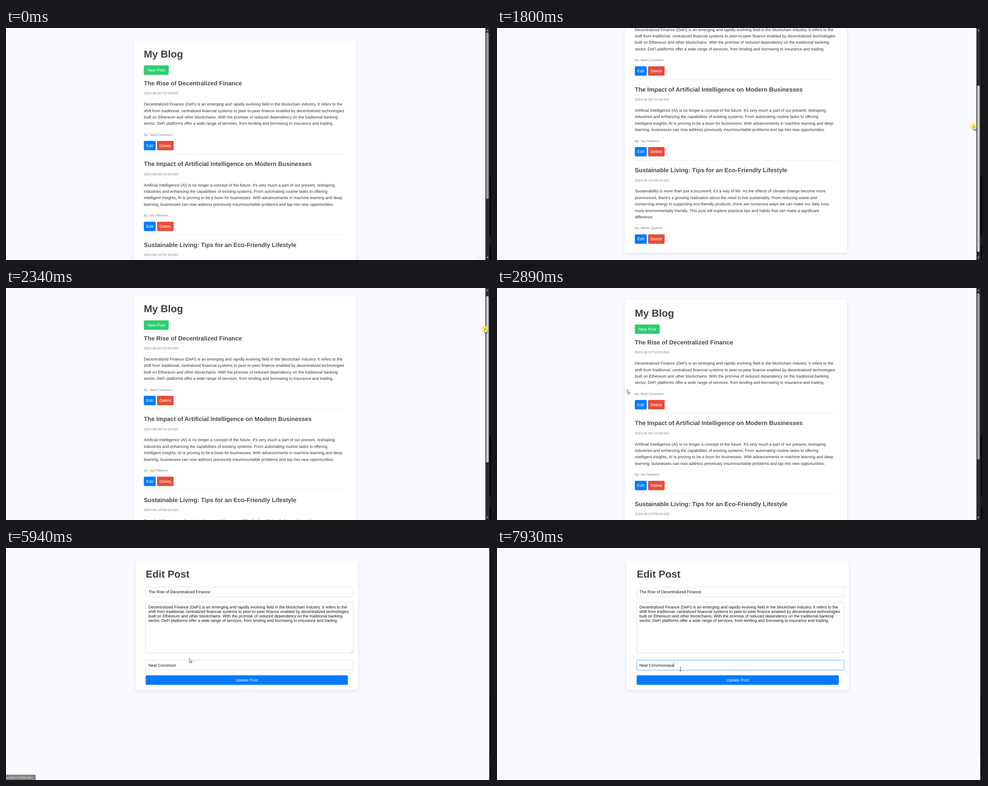
An HTML page for the animation above (8 s loop, 1082 by 518 pixels).

```html
<!DOCTYPE html>
<html lang="en">
<head>
<meta charset="utf-8">
<title>My Blog</title>
<style>
  html, body { margin: 0; width: 100%; height: 100%; overflow: hidden; background: #f8faff; }
  svg { display: block; width: 1082px; height: 518px; }
  text { font: 9px "Liberation Sans", Arial, sans-serif; fill: #333; text-rendering: geometricPrecision; }
  .h1 { font-size: 22.5px; font-weight: bold; fill: #404040; }
  .h2 { font-size: 13.5px; font-weight: bold; fill: #4a4a4a; }
  .small { font-size: 7.5px; fill: #808080; }
  .btn { fill: #fff; }
  .mid { text-anchor: middle; }
  .form { fill: #111; }
  .status { font-size: 6.8px; fill: #eadccd; }
  .field { fill: #fff; stroke: #d9d9d9; stroke-width: .8; }
</style>
</head>
<body>
<svg id="stage" viewBox="0 0 1082 518" xmlns="http://www.w3.org/2000/svg">
  <defs>
    <filter id="shadow" x="-10%" y="-10%" width="120%" height="120%">
      <feDropShadow dx="0" dy="2.2" stdDeviation="3.4" flood-color="#000" flood-opacity=".1"/>
    </filter>
  </defs>
  <rect width="1082" height="518" fill="#f8faff"/>
  <g id="list"></g>
  <g id="edit"></g>
  <g id="corner">
    <rect x="1049.5" y="510.5" width="21" height="9" fill="#f7f8fc" stroke="#e8eaf0" stroke-width=".8"/>
    <text x="1053" y="517" class="small" style="fill:#c8cad0">...</text>
  </g>
  <g id="bar">
    <rect x="1069.5" width="9" height="518" fill="#2b2b2b"/>
    <path d="M1071.4 6.8h5l-2.5-3.6zM1071.4 510.8h5l-2.5 3.6z" fill="#a0a0a0"/>
    <rect id="thumb" x="1071.2" y="10" width="5.6" height="371.5" rx="2.8"/>
  </g>
  <rect x="1078.3" width="4" height="518" fill="#000"/>
  <rect x="1079" width="3" height="331" fill="#161616"/>
  <rect x="1078.3" y="464.5" width="4" height="22.5" fill="#1d1d1d"/>
  <g id="status">
    <rect id="statusBox" x="-2" y="506.3" height="14" rx="1.5" fill="#1f140b" stroke="#574535" stroke-width=".7"/>
    <text id="statusText" class="status" x="-1.6" y="514.6"></text>
  </g>
  <circle id="press" r="7" fill="#fbe635" opacity=".75"/>
  <g id="cursor" stroke-linejoin="round">
    <path id="arrow" d="M0 0V9.6L2.3 7.5L3.8 10.8L5.2 10.2L3.7 7H6.7Z" fill="#fff" stroke="#333" stroke-width=".75"/>
    <path id="hand" d="M-.9.9Q-.9 0 0 0T.9.9V4.2Q1.8 3.6 2.5 4.5Q3.4 4 4 4.9Q5.3 4.7 5.3 6V8.8Q5.3 10.4 4.4 11.2V12.6H-.9V11.3Q-2 10-3.5 7.6Q-3.7 6.3-2.4 6.7L-.9 8Z" fill="#fff" stroke="#333" stroke-width=".75"/>
    <path id="beam" d="M-1.8-4.4H-.5L0-4L.5-4.4H1.8M0-4V4M-1.8 4.4H-.5L0 4L.5 4.4H1.8" fill="none" stroke="#333" stroke-width=".8"/>
  </g>
</svg>
<script>
const $ = id => document.getElementById(id);
const PITCH = 180.4, LEAD = 14.4, LOOP = 8000;
const AUTHOR = "Neal Corvinson";

const posts = [
  ["The Rise of Decentralized Finance", "2023-08-01T10:00:00Z", AUTHOR, [
    "Decentralized Finance (DeFi) is an emerging and rapidly evolving field in the blockchain industry. It refers to the",
    "shift from traditional, centralized financial systems to peer-to-peer finance enabled by decentralized technologies",
    "built on Ethereum and other blockchains. With the promise of reduced dependency on the traditional banking",
    "sector, DeFi platforms offer a wide range of services, from lending and borrowing to insurance and trading."]],
  ["The Impact of Artificial Intelligence on Modern Businesses", "2023-08-05T14:30:00Z", "Ida Pellarins", [
    "Artificial Intelligence (AI) is no longer a concept of the future. It's very much a part of our present, reshaping",
    "industries and enhancing the capabilities of existing systems. From automating routine tasks to offering",
    "intelligent insights, AI is proving to be a boon for businesses. With advancements in machine learning and deep",
    "learning, businesses can now address previously insurmountable problems and tap into new opportunities."]],
  ["Sustainable Living: Tips for an Eco-Friendly Lifestyle", "2023-08-10T09:15:00Z", "Martin Quarne", [
    "Sustainability is more than just a buzzword; it's a way of life. As the effects of climate change become more",
    "pronounced, there's a growing realization about the need to live sustainably. From reducing waste and",
    "conserving energy to supporting eco-friendly products, there are numerous ways we can make our daily lives",
    "more environmentally friendly. This post will explore practical tips and habits that can make a significant",
    "difference."]]
];

const text = (x, y, s, cls = "", id = "") => `<text x="${x}" y="${y}" class="${cls}" id="${id}">${s}</text>`;
const box = (x, y, w, h, attrs) => `<rect x="${x}" y="${y}" width="${w}" height="${h}" ${attrs}/>`;
const card = (x, h) => box(x, 28, 496, h, 'rx="4.5" fill="#fff" filter="url(#shadow)"');
const button = (x, y, w, fill, label, id = "") =>
  box(x, y, w, 21, `rx="2.3" fill="${fill}" id="${id}"`) + text(x + w / 2, y + 13.5, label, "btn mid");

function listPage() {
  let s = card(285, 640) + text(307.5, 65.6, "My Blog", "h1") +
    button(307.5, 83.4, 55.5, "#2ecc71", "New Post", "newBtn");
  posts.forEach(([title, date, by, lines], i) => {
    const y = i * PITCH, end = y + (lines.length - 4) * LEAD;
    s += text(307.5, 128 + y, title, "h2") + text(307.5, 148.4 + y, date, "small");
    lines.forEach((line, n) => s += text(307.5, 173.1 + y + n * LEAD, line));
    s += text(307.5, 240.7 + end, "By: " + by, "small") +
      button(307.5, 252 + end, 26.5, "#007bff", "Edit", "edit" + i) +
      button(337, 252 + end, 37, "#e74c3c", "Delete", "del" + i);
    if (i < 2) s += box(307.5, 281.2 + y, 450.5, .7, 'fill="#e6e6e6"');
  });
  return s;
}

function editPage() {
  const field = (y, h, id = "") => box(311.6, y, 463, h, `rx="2" class="field" id="${id}"`);
  let s = card(289, 289) + text(311.8, 65.6, "Edit Post", "h1") +
    field(87, 22.3) + text(317.8, 101.1, posts[0][0], "form") + field(121, 113.4);
  posts[0][3].forEach((line, n) => s += text(317.8, 134.8 + n * 10.13, line, "form"));
  return s + '<path d="M769.8 233.6l4-4M772 233.6l1.8-1.8" stroke="#777" stroke-width=".6"/>' +
    field(250.4, 22.3, "authorBox") + text(317.8, 264.5, AUTHOR, "form", "author") +
    box(0, 256.6, .8, 10, 'id="caret" fill="#111"') +
    box(311.6, 284.2, 451, 21.3, 'rx="2.3" fill="#007bff"') + text(537.1, 297.6, "Update Post", "btn mid");
}

$("list").innerHTML = listPage();
$("edit").innerHTML = editPage();

// each key: time, values...
const path = [
  [70, 903, 520], [300, 915, 400], [600, 990, 190], [840, 1050, 95], [1000, 1052, 96],
  [1400, 1068, 95], [1610, 1068, 97], [1800, 1063, 219], [1870, 1063, 229], [1930, 1064, 226],
  [2340, 1068, 91], [2440, 1068, 89], [2500, 1062, 92], [2890, 290.5, 226.5], [2980, 282, 234],
  [3230, 300, 249], [3300, 302, 251], [3450, 320, 260], [3850, 352, 261], [4250, 352, 261],
  [4450, 349, 95], [4590, 351.5, 93.8], [4750, 350, 95], [4990, 321, 259], [5470, 321, 259],
  [5940, 409, 246.5], [6150, 414, 256], [6350, 409.4, 270.5]
];
const scrolls = [[1580, 0], [1800, 166.4], [1870, 177], [1930, 174], [2340, 11.2], [2480, 2]];
const presses = [[1400, 2480], [5080, 5230], [6750, 6900]];

function at(keys, t) {
  if (t <= keys[0][0]) return keys[0].slice(1);
  for (let i = 1; i < keys.length; i++) {
    const a = keys[i - 1], b = keys[i];
    if (t < b[0]) {
      const k = (t - a[0]) / (b[0] - a[0]);
      return a.slice(1).map((v, n) => v + (b[n + 1] - v) * k);
    }
  }
  return keys[keys.length - 1].slice(1);
}

const within = (t, a, b) => t >= a && t < b;
const show = (id, on) => $(id).setAttribute("display", on ? "inline" : "none");
const set = (id, name, v) => $(id).setAttribute(name, v);

function draw(t) {
  const editing = t >= 5470;
  const [scroll] = at(scrolls, t), [x, y] = at(path, t);
  show("list", !editing);
  show("edit", editing);
  show("bar", !editing);
  show("corner", t < 140);
  set("list", "transform", `translate(0 ${-scroll})`);
  set("thumb", "y", 10 + scroll * .71);
  set("thumb", "fill", within(t, 910, 2520) ? "#cdcdcd" : "#9d9d9d");

  const py = y + scroll;
  const over = (l, r, top) => !editing && within(x, l, r) && within(py, top, top + 21);
  const onNew = over(307.5, 363, 83.4), onEdit = over(307.5, 334, 252), onDel = over(337, 374, 252);
  set("newBtn", "fill", onNew ? "#2bc76e" : "#2ecc71");
  set("edit0", "fill", onEdit ? "#0069d9" : "#007bff");
  set("del0", "fill", onDel ? "#d04436" : "#e74c3c");

  const toNew = within(t, 4440, 4880);
  show("status", within(t, 3400, 6010));
  set("status", "opacity", Math.max(0, Math.min(1, (6010 - t) / 130)));
  set("statusBox", "width", toNew ? 62 : 68);
  $("statusText").textContent = "localhost:3000/" + (toNew ? "new" : "edit/1");

  const typed = [7590, 7720, 7860].filter(k => t >= k).length;
  $("author").textContent = AUTHOR + "asa".slice(0, typed);
  const focus = t >= 6760;
  set("authorBox", "style", focus ? "stroke:#2a8df5" : "");
  show("caret", focus && !within(t, 7260, 7590));
  if (focus) set("caret", "x", 317.8 + $("author").getComputedTextLength());

  const beam = editing && within(y, 251, 273);
  const hand = onNew || onEdit || onDel;
  show("cursor", t >= 70);
  show("hand", hand);
  show("beam", beam);
  show("arrow", !hand && !beam);
  set("cursor", "transform", `translate(${x} ${y})`);
  show("press", presses.some(([a, b]) => within(t, a, b)));
  set("press", "cx", x);
  set("press", "cy", y);
}

const start = performance.now();
function tick() {
  draw((performance.now() - start) % LOOP);
  requestAnimationFrame(tick);
}
tick();
</script>
</body>
</html>
```
